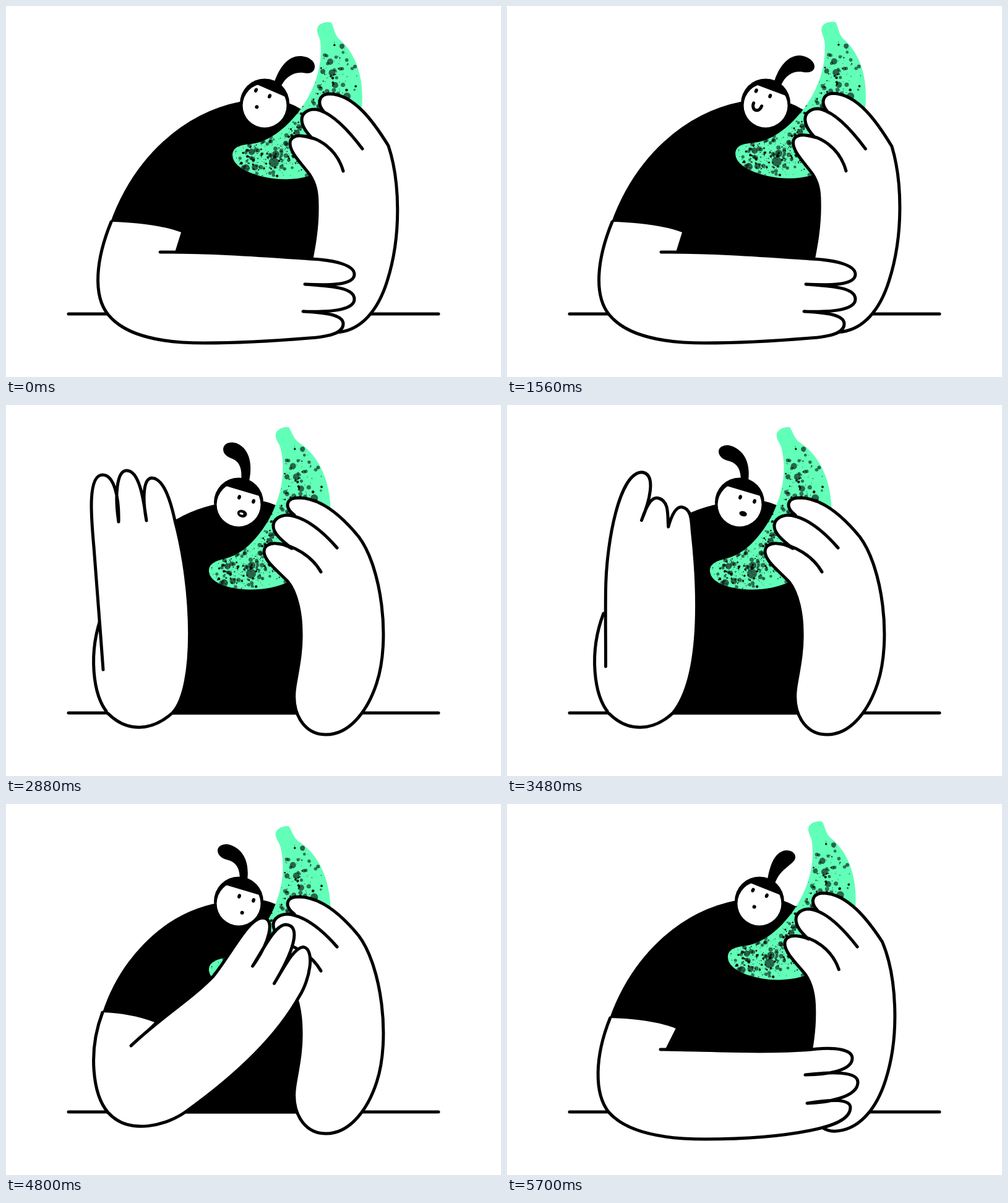
An HTML page for the animation above (5760 ms loop, 800 by 600 pixels).

```html
<!DOCTYPE html>
<html lang="en">
<head>
<meta charset="utf-8">
<title>Banana call</title>
<style>
  html, body { margin: 0; height: 100%; overflow: hidden; background: #fff; }
  svg { display: block; width: 100%; height: 100%; }
  .ink { fill: none; stroke: #000; stroke-width: 5; stroke-linecap: round; stroke-linejoin: round; }
  .skin { fill: #fff; }
</style>
</head>
<body>
<svg viewBox="0 0 800 600">
  <defs>
    <path id="peel" d="M503 37 C504 28 518 24 526 27 C530 35 531 48 540 55 C568 80 579 120 575 165 C565 220 530 270 489 275 C470 281 445 282 420 277 C390 271 366 258 366 241 C367 224 385 225 403 222 C430 216 455 195 476 167 C500 133 512 95 508 58 C507 50 502 45 503 37Z"/>
    <clipPath id="peelClip"><use href="#peel"/></clipPath>
    <clipPath id="headClip"><circle r="39" cy="-1"/></clipPath>
  </defs>
  <path class="ink" d="M101 498H699"/>
  <path id="body" class="ink" style="fill:#000"/>
  <path id="hair"/>
  <g id="head">
    <circle r="40" cy="-.5"/>
    <circle r="35.500" cy="3" fill="#fff"/>
    <g clip-path="url(#headClip)"><path id="fringe" d="M-50 -60H50V0H-50Z"/></g>
    <g id="face">
      <ellipse cx="-12" rx="2.800" ry="3.800"/>
      <ellipse cx="12" rx="2.800" ry="3.800"/>
      <path id="smile" class="ink" d="M-9 20 C-9 33 5 33 5 20"/>
      <ellipse id="mouth" cy="24.300"/>
      <ellipse id="gap" cx="-1" cy="24.500" rx="3.200" ry="1.700" fill="#fff"/>
    </g>
  </g>
  <g id="banana">
    <use href="#peel" fill="#62ffb8"/>
    <g id="spots" clip-path="url(#peelClip)"></g>
  </g>
  <path id="rightArm" class="ink skin"/>
  <path id="cuff" class="skin"/>
  <path id="side" class="ink"/>
  <path id="leftArm" class="ink skin"/>
</svg>
<script>
const LOOP = 5760, STEP = 60;
const $ = id => document.getElementById(id);
const lerp = (a, b, k) => a + (b - a) * k;

// Blend two numbers, or two paths with the same commands
function mix(a, b, k) {
  if (typeof a === 'number') return lerp(a, b, k);
  const ends = b.match(/[\d.]+/g);
  let i = 0;
  return a.replace(/[\d.]+/g, n => lerp(+n, +ends[i++], k).toFixed(2));
}

// Keys are [time, value, power]; without a power the segment eases both ways
function at(keys, t) {
  let i = 1;
  while (i < keys.length - 1 && t >= keys[i][0]) i++;
  const [t0, a] = keys[i - 1], [t1, b, power] = keys[i];
  const k = Math.min(1, (t - t0) / (t1 - t0));
  return mix(a, b, power ? k ** power : k * k * (3 - 2 * k));
}

// Each pair runs from upright (0) to leaning left (1)
const BODY = [
  'M171 351 C209 246 288 175 380 157 C415 150 450 153 474 168 L505 185 L515 330 L515 498 L200 498Z',
  'M158 339 C183 262 247 180 345 162 C380 153 415 154 434 164 L470 185 L495 320 L495 498 L200 498Z'];
const SIDE = [
  'M165 499 C140 468 145 410 170 349',
  'M165 499 C140 470 132 400 156 337'];
const CUFF = [
  'C210 350 255 355 283 366 L273 398 L300 480Z',
  'C185 338 215 343 240 353 L202 391 L230 480Z'];
const RIGHT = [
  'M513 170 C502 157 506 142 524 142 C563 144 594 187 618 226 C636 280 640 370 616 445 C602 490 575 526 533 528 C505 528 485 490 488 440 C493 410 504 370 503 322 C503 300 500 287 491 273 C479 256 459 238 459 222 C459 213 468 209 477 210 C485 211 490 212 495 214 C486 205 478 195 478 184 C478 173 488 167 499 167 C505 167 509 169 513 170 M477 210 C505 211 535 232 545 267 M499 167 C525 170 555 203 576 231',
  'M466 178 C449 165 452 150 474 150 C512 151 547 185 570 213 C607 262 622 380 599 450 C586 490 558 533 517 533 C483 533 460 500 467 455 C471 430 478 400 477 368 C477 340 471 305 456 286 C439 268 417 252 417 237 C417 228 426 223 437 224 C447 224 455 228 462 232 C446 219 432 208 432 196 C432 184 443 179 454 178 C459 178 462 178 466 178 M437 224 C465 226 495 245 509 270 M454 178 C484 180 514 207 535 231'];

// Left arm poses
const rest = 'M249 398 C330 397 420 404 492 409 C535 411 563 420 563 434 C563 452 520 452 483 450 C525 453 563 455 563 474 C563 494 515 495 480 494 C520 496 545 500 545 514 C545 530 520 535 490 537 C430 542 370 545 320 545 C240 545 190 530 165 499';
const landing = 'M248 397 C330 398 420 403 492 397 C533 392 558 398 558 411 C558 432 515 438 482 438 C525 433 567 432 567 450 C567 475 515 483 485 484 C522 478 555 476 555 491 C555 512 520 522 490 528 C430 540 370 542 320 542 C240 542 190 527 165 499';
const raised = 'M157 428 C152 360 146 280 142 230 C138 185 131 113 156 113 C175 113 183 150 182 189 C176 150 178 106 195 106 C215 106 222 150 227 187 C220 150 222 118 236 118 C255 119 266 155 273 187 C303 300 307 455 270 497 C235 529 195 529 165 499';
const curled = 'M160 422 C161 380 161 340 163 300 C166 230 190 108 230 108 C255 112 238 160 224 186 C238 155 248 156 254 159 C272 165 266 185 267 199 C275 182 283 172 292 174 C305 177 304 190 304 205 C308 270 322 430 268 498 C235 529 195 529 165 499';
const cover = 'M202 391 C250 345 300 315 335 278 C365 240 392 184 414 184 C436 184 425 225 398 262 C418 230 435 195 452 195 C478 197 463 240 433 290 C450 262 465 232 480 231 C500 235 490 285 474 310 C430 390 350 455 290 498 C262 518 200 538 165 499';
const LEFT = [
  [0, rest], [160, mix(landing, rest, 1.15)], [500, rest], [2470, rest],
  [2880, raised], [3020, mix(curled, raised, 1.3)], [3240, raised], [3560, curled],
  [3840, mix(curled, raised, .1)], [4140, curled], [4280, curled],
  [4400, mix(curled, cover, -.08)], [4640, mix(curled, cover, 1.08)], [4820, cover],
  [5330, cover], [5700, landing, 1.2], [LOOP, rest, 1]];

// Ponytail poses
const tail = 'M434 122 C442 100 455 81 475 81 C490 81 500 90 499 99 C498 109 488 110 480 108 C465 106 452 115 445 129';
const tailUp = 'M430 122 C434 100 445 74 468 74 C484 75 492 85 491 92 C490 101 480 102 472 101 C458 100 445 108 441 127';
const tailLow = 'M434 122 C442 105 458 86 478 86 C492 87 503 97 503 105 C502 114 490 115 482 112 C468 109 455 115 445 129';
const tailFlip = 'M393 123 C398 100 396 72 373 62 C362 58 352 62 351 71 C351 80 358 84 366 87 C378 92 382 104 380 123';
const tailLeft = 'M390 123 C393 100 388 75 362 66 C352 63 342 68 342 75 C342 84 351 89 360 91 C373 95 378 105 378 123';
const tailBack = 'M421 122 C424 105 430 78 450 75 C460 74 467 80 466 87 C465 93 458 97 454 101 C445 108 438 115 433 128';
const HAIR = [
  [0, tail], [300, tail], [840, tailUp], [1320, tailLow], [1800, tailUp], [2280, tailLow],
  [2470, tailLow], [2880, tailFlip], [3240, tailLeft], [5330, tailLeft],
  [5700, tailBack, 1], [LOOP, tail, 1]];

const LEAN = [[0, 0], [2470, -.13, 1], [2880, 1], [5330, 1], [5700, .24, 1.1], [LOOP, 0, 1]];
const NOD = [[0, 0], [300, 0], [840, 1], [1320, 0], [1800, 1], [2280, 0], [LOOP, 0]];

// Speckles scattered along the banana's spine, denser at the lower end
let seed = 11;
const rnd = () => (seed = (seed * 16807) % 2147483647) / 2147483647;
let dots = '';
const dot = (x, y, r, o) =>
  dots += `<circle cx="${x.toFixed(1)}" cy="${y.toFixed(1)}" r="${r.toFixed(1)}" opacity="${o}"/>`;
for (const [x, y, r] of [[524, 90, 5], [527, 108, 5.5], [512, 106, 4], [543, 65, 4], [532, 128, 5],
  [551, 146, 6], [564, 98, 3], [397, 236, 5], [433, 253, 8], [402, 261, 5], [388, 262, 6],
  [436, 240, 6], [470, 205, 5], [480, 194, 4], [452, 222, 4]]) dot(x, y, r, .6);
for (let i = 0; i < 720; i++) {
  const k = rnd() ** 1.8, u = 1 - k;
  const x = u * u * 385 + 2 * u * k * 525 + k * k * 535 + (rnd() + rnd() - 1) * 52;
  const y = u * u * 250 + 2 * u * k * 250 + k * k * 80 + (rnd() + rnd() - 1) * 44;
  const r = .5 + 3.2 * rnd() ** 4;
  dot(x, y, r, r > 2.3 ? .55 : rnd() < .35 ? .5 : .9);
}
$('spots').innerHTML = dots;

const path = (id, d) => $(id).setAttribute('d', d);
const place = (id, value) => $(id).setAttribute('transform', value);

function drawMouth(t) {
  const talking = t >= 2700 && t < 4320, open = talking && Math.floor(t / 120) % 2 === 0;
  const smiling = t >= 420 && t < 2520;
  $('smile').style.display = smiling ? '' : 'none';
  $('mouth').style.display = smiling ? 'none' : '';
  $('gap').style.display = open ? '' : 'none';
  $('mouth').setAttribute('rx', open ? 8 : talking ? 6.3 : 3);
  $('mouth').setAttribute('ry', open ? 6 : talking ? 4.2 : 3);
}

function draw(now) {
  const t = Math.floor(now % LOOP / STEP) * STEP;
  const lean = at(LEAN, t), bend = Math.max(0, lean), nod = at(NOD, t);
  const angle = lerp(23.5, 16.5, bend) - 6 * nod;

  path('body', mix(...BODY, bend));
  path('hair', at(HAIR, t));
  place('head', `translate(${418 - 42 * bend} 158)`);
  place('fringe', `rotate(${angle}) translate(0 ${-23.5 + 3.5 * bend})`);
  place('face', `translate(${lerp(-3, 12.5, bend) - 2 * nod} ${lerp(-17, -5.5, bend) + nod / 2}) rotate(${angle})`);
  drawMouth(t);
  place('banana', `translate(${-38 * lean} ${29 * lean}) rotate(${-7.9 * lean} 366 241)`);
  path('rightArm', mix(...RIGHT, lean));

  const side = mix(...SIDE, bend);
  path('side', side);
  path('cuff', side + mix(...CUFF, bend));
  path('leftArm', at(LEFT, t));
}

const start = performance.now();
(function frame() {
  draw(performance.now() - start);
  requestAnimationFrame(frame);
})();
</script>
</body>
</html>
```
